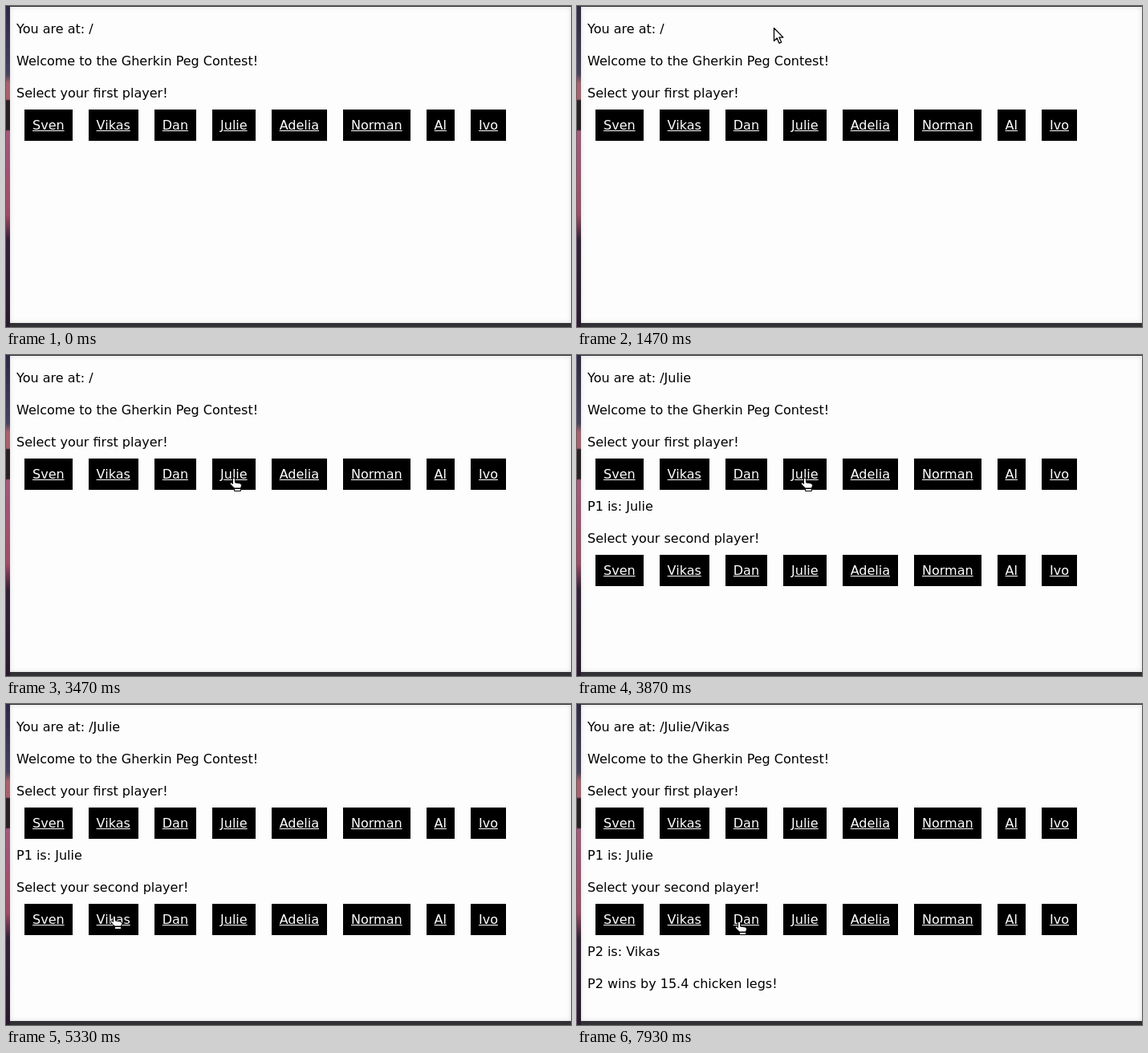
Recreate the animation shown at these times as an HTML page. Size 704x400 px, loop 8 s.

```html
<!DOCTYPE html>
<html lang="en">
<head>
<meta charset="utf-8">
<title>Player picker</title>
<style>
  html, body { margin: 0; width: 100%; height: 100%; overflow: hidden; }
  body { position: relative; background: #323236; font: 16px/19px "DejaVu Sans", sans-serif; }
  #wall {
    position: absolute; width: 5px; height: 400px;
    background: linear-gradient(#2c2845, #46425f 85px, #a8606c 96px 116px,
      #2a2024 118px 154px, #a4587c 156px, #a04c66 260px, #35203a 292px, #2a1a30);
  }
  #page {
    position: absolute; left: 5px; top: 1px; width: 699px; height: 394px;
    box-sizing: border-box; padding: 18px 8px;
    background: #fdfdfd; box-shadow: inset 0 0 6px #0002;
  }
  p, nav { height: 40px; margin: 0; color: #000; white-space: pre; }
  nav { display: flex; gap: 20px; padding-left: 10px; }
  a {
    height: 19px; margin-top: -10px; padding: 10px;
    background: #000; color: #fff; text-decoration: underline;
  }
  svg { position: absolute; left: 0; top: 0; overflow: visible; pointer-events: none; }
  path { fill: #fff; stroke: #000; stroke-linejoin: round; }
</style>
</head>
<body>
<div id="wall"></div>
<div id="page">
  <p id="address"></p>
  <p>Welcome to the Gherkin Peg Contest!</p>
  <p>Select your first player!</p>
  <nav></nav>
  <div id="second">
    <p>P1 is: Julie</p>
    <p>Select your second player!</p>
    <nav></nav>
  </div>
  <div id="result">
    <p>P2 is: Vikas</p>
    <p>P2 wins by 15.4 chicken legs!</p>
  </div>
</div>
<svg id="cursor" width="20" height="20">
  <path id="arrow" stroke-width="1.3" d="M.5 .5v16l3.7-3.5 2.7 6.3 2.7-1.2-2.7-6h5z"/>
  <path id="hand" d="M-1.5 0q1.5-2 3 0v5l6 1q2 .5 2 2.5l-1 3.5h-8l-5-5q-1-2 1-2l2 1.5zM.5 12.5h8v3h-8z"/>
</svg>
<script>
// All times count steps of 1/15 s.
const STEP = 1000 / 15, LOOP = 120;
const APPEAR = 22, FIRST_PICK = 54, SECOND_PICK = 83;
const players = ["Sven", "Vikas", "Dan", "Julie", "Adelia", "Norman", "Al", "Ivo"];
const home = [245, 27];
const moves = [
  { from: 22, to: 28, x: 209, y: 58 },
  { from: 33, to: 40, x: 280, y: 108 },
  { from: 40, to: 46, x: 288, y: 157 },
  { from: 46, to: 52, x: 284, y: 154 },
  { from: 60, to: 66, x: 251, y: 199 },
  { from: 66, to: 73, x: 171, y: 217 },
  { from: 73, to: 80, x: 135, y: 265 },
  { from: 91, to: 98, x: 170, y: 216 },
  { from: 103, to: 115, x: 284, y: 275 },
  { from: 117, to: 119, x: 202, y: 272 }
];

const $ = id => document.getElementById(id);
const show = (id, on) => { $(id).style.visibility = on ? "visible" : "hidden"; };

for (const nav of document.querySelectorAll("nav"))
  nav.innerHTML = players.map(name => `<a>${name}</a>`).join("");

function pointerAt(step) {
  let [x, y] = home;
  for (const m of moves) {
    const k = Math.min(1, Math.max(0, (step - m.from) / (m.to - m.from)));
    x += (m.x - x) * k;
    y += (m.y - y) * k;
  }
  return [Math.round(x), Math.round(y)];
}

function frame() {
  // A small lead absorbs times rounded to 10 ms.
  const step = Math.floor((performance.now() + 4) / STEP) % LOOP;
  const picks = (step >= FIRST_PICK) + (step >= SECOND_PICK);
  $("address").textContent = "You are at: /" + ["Julie", "Vikas"].slice(0, picks).join("/");
  show("second", picks > 0);
  show("result", picks > 1);

  const [x, y] = pointerAt(step);
  const overLink = document.elementFromPoint(x, y)?.tagName === "A";
  $("cursor").style.transform = `translate(${x}px,${y}px)`;
  show("arrow", step >= APPEAR && !overLink);
  show("hand", step >= APPEAR && overLink);
  requestAnimationFrame(frame);
}
frame();
</script>
</body>
</html>
```
